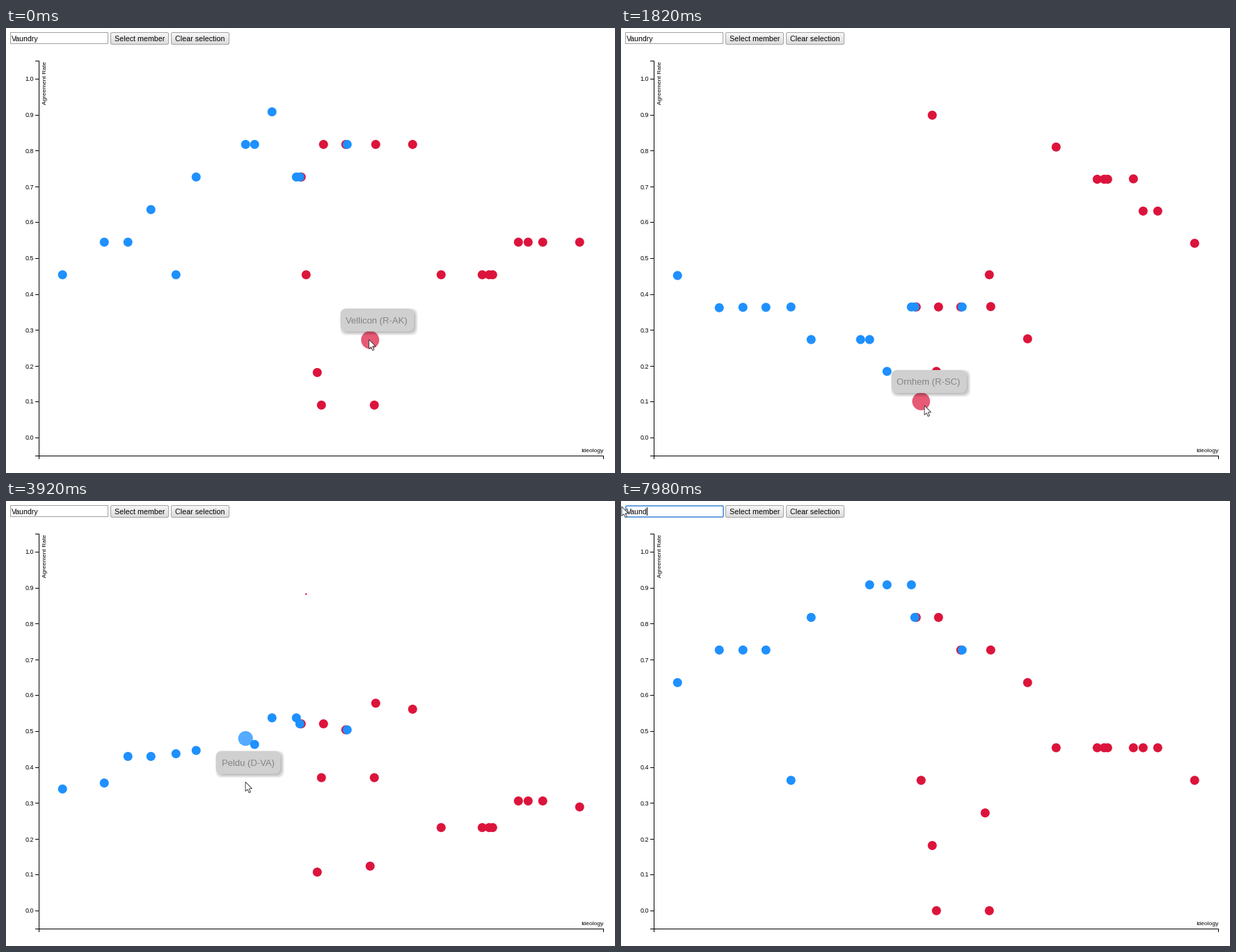
These frames come from a looping animation (875 by 640 pixels, 8 s). A matplotlib script:

```python
import numpy as np
import matplotlib.pyplot as plt
from matplotlib.animation import FuncAnimation
from matplotlib.collections import LineCollection
from matplotlib.colors import to_rgba
from matplotlib.patches import FancyBboxPatch, Polygon, Rectangle

W, H, DPI = 875, 640, 100
PT = 72 / DPI          # points per pixel
STEP = 70              # ms between picture changes
TICK = 20              # ms per drawn frame
LOOP = 8000
FADE_IN, FADE_OUT, MOVE = 200, 500, 1000

BLUE, RED = "#1e90ff", "#dc143c"
R, R_HOVER = 6.5, 13
VOTES = 11             # full agreement; only the selected member has it

# Voting blocs: ideology of the members, then the agreement of the bloc's
# leftmost and rightmost member in each of the four views.
BLOCS = [
    ((81, 141, 175, 208, 273, 344, 357, 382),
     (5, 5, 3, 7), (9.5, 2.4, 4.62, 10.2)),
    ((417, 422, 424, 456, 488, 490, 531, 584),
     (8.4, 4, 4.9, 9.55), (9.4, 3.4, 6.1, 7)),
    ((625, 684, 694, 699, 736, 750, 771, 824),
     (5, 9.4, 2, 5.1), (6, 6.1, 2.95, 4.4)),
    ((244, 431), (5, 4, 5, 4), (5, 1, 5, 4)),
    ((447, 523), (2, 10, 1, 2), (3, 10, 1, 3)),
    ((453, 529), (1, 2, 5, 0), (1, 5, 5, 0)),
]

# ideology, name, and when the dot is entered, clicked and left
PICKS = [
    (523, "Vellicon (R-AK)", -600, -20, 250),
    (431, "Ornhem (R-SC)", 1240, 1678, 2330),
    (344, "Peldu (D-VA)", 3350, 3562, 4480),
]

# pointer moves: start and end time, destination
ORIGIN = (521.5, 448)
LEGS = [
    (140, 840, 439, 516), (1050, 1330, 436, 543), (2310, 2800, 351, 410),
    (3220, 3360, 344, 404), (4410, 5250, 95.5, 18.5), (5880, 6230, 10, 14),
    (6370, 6440, 1, 8),
]

NAME = "Vaundry"
FOCUS, DRAG = 5460, 5950
KEYS = np.array([7490, 7630, 7770, 7840, 7980])


def clamp(u):
    return min(max(u, 0.0), 1.0)


def smooth(u):
    return u * u * (3 - 2 * u)


def cubic(u):
    return 4 * u ** 3 if u < 0.5 else 1 - 4 * (1 - u) ** 3


def level(rate):
    return 589.2 - 515.5 * rate


def is_blue(x):
    return x < 423 or x == 490


def members():
    """One row per member: ideology and the agreement in each view."""
    rows = []
    for xs, first, last in BLOCS:
        for x in xs:
            u = (x - xs[0]) / (xs[-1] - xs[0])
            line = np.array(first) + u * (np.array(last) - first)
            rows.append([x, *np.round(line)])
    rows = np.array(sorted(rows, key=lambda row: is_blue(row[0])))
    for view, pick in enumerate(PICKS, 1):
        rows[rows[:, 0] == pick[0], view + 1] = VOTES
    return rows


def pointer(t):
    pos = np.array(ORIGIN, float)
    for start, end, *goal in LEGS:
        pos += smooth(clamp((t - start) / (end - start))) * (goal - pos)
    return pos


fig = plt.figure(figsize=(W / DPI, H / DPI), dpi=DPI, facecolor="white")
ax = fig.add_axes([0, 0, 1, 1])
ax.set_xlim(0, W)
ax.set_ylim(H, 0)
ax.axis("off")


def label(x, y, s, px, **kw):
    kw = {"color": "black", "va": "baseline", **kw}
    return ax.text(x, y, s, fontsize=px * PT, family="Liberation Sans", **kw)


def strokes(segs, color="black", z=2):
    lines = LineCollection(segs, colors=color, linewidths=PT, zorder=z,
                           capstyle="projecting", snap=False)
    return ax.add_collection(lines, autolim=False)


def rounded(x, y, w, h, radius, **kw):
    style = f"round,pad=0,rounding_size={radius}"
    return ax.add_patch(FancyBboxPatch((x, y), w, h, boxstyle=style,
                                       snap=False, **kw))


def draw_axes():
    left, right, top, bottom = 47.5, 858.5, 47.5, 615.5
    segs = [[(left - 5, top), (left, top), (left, bottom), (left - 5, bottom)],
            [(left, bottom + 4), (left, bottom), (right, bottom),
             (right, bottom + 4)]]
    for rate in np.arange(11) / 10:
        y = np.floor(level(rate)) + 0.5
        segs.append([(left - 5, y), (left, y)])
        label(40, y + 3, f"{rate:.1f}", 8.9, ha="right")
    strokes(segs)
    label(right, 610.5, "Ideology", 8.5, ha="right")
    label(58.5, top, "Agreement Rate", 8.5, rotation=90, ha="right",
          rotation_mode="anchor")


def draw_button(x, w, s):
    shade = np.linspace(0.965, 0.865, 16)
    rows = [[(x + 1.5, 7.5 + i), (x + w - 1.5, 7.5 + i)] for i in range(16)]
    strokes(rows, [(g, g, g) for g in shade], 1)
    rounded(x + 0.5, 6.5, w - 1, 17, 2, fc="none", ec="#a3a3a3", lw=PT)
    label(x + w / 2, 19, s, 10.6, ha="center")


draw_axes()
draw_button(150, 84, "Select member")
draw_button(237, 84, "Clear selection")

plain_box = ax.add_patch(Rectangle((6.5, 6.5), 140, 16, fc="none",
                                   ec="#a0a0a0", lw=PT, snap=False))
focus_box = rounded(7, 7, 140, 16, 1.5, fc="none", ec="#6aa3e4", lw=2 * PT)

# right edge of every prefix of the typed name
typed = label(8, 19, NAME, 10.5, zorder=4)
edges = [8.0]
for n in range(1, len(NAME) + 1):
    typed.set_text(NAME[:n])
    edges.append(typed.get_window_extent().x1)
edges = np.array(edges)
marked = label(8, 19, "", 10.5, color="white", zorder=4)
mark = ax.add_patch(Rectangle((8, 9), 0, 12, fc="#3390ff", lw=0, zorder=3))
caret = strokes([[(0, 0), (0, 0)]], z=4)

DOTS = members()
RGBA = np.array([to_rgba(BLUE if is_blue(x) else RED) for x in DOTS[:, 0]])
dots = ax.scatter(DOTS[:, 0], DOTS[:, 1], s=1, zorder=3, linewidths=0)

GROW = np.arange(-2, 4)
shadow = [rounded(0, 0, 9, 9, 9, fc="black", lw=0, zorder=5) for _ in GROW]
tip_box = rounded(0, 0, 9, 9, 9, fc="#d0d0d0", lw=0, zorder=6)
tip_text = label(0, 0, "", 13, color="#858287", zorder=7)

ARROW = np.array([(0, 0), (0, 13.5), (3, 10.7), (5.2, 15.6), (7.4, 14.6),
                  (5.2, 9.9), (9.4, 9.6)])
arrow = ax.add_patch(Polygon(ARROW, fc="white", ec="#333333", lw=0.9 * PT,
                             zorder=10, snap=False))
BEAM = np.array([[(-3, -5.5), (3, -5.5)], [(0, -5.5), (0, 5.5)],
                 [(-3, 5.5), (3, 5.5)]])
beam = strokes(BEAM, "#333333", 10)


def update_dots(t):
    k = max(i for i, pick in enumerate(PICKS) if t >= pick[3])
    p = cubic(clamp((t - PICKS[k][3]) / MOVE))
    a, b = DOTS[:, k + 1], DOTS[:, k + 2]
    r0 = np.where(b == VOTES, R_HOVER, np.where(a == VOTES, 0, R))
    r1 = np.where(b == VOTES, 0, R)
    size = r0 + p * (r1 - r0)
    rgba = RGBA.copy()
    rgba[b == VOTES, 3] = 0.7 + 0.3 * p
    if k + 1 < len(PICKS):
        x, _, enter, *_ = PICKS[k + 1]
        grow = clamp((t - enter) / FADE_IN)
        hovered = DOTS[:, 0] == x
        size[hovered] += (R_HOVER - R) * grow
        rgba[hovered, 3] = 1 - 0.3 * grow
    y = level((a + p * (b - a)) / VOTES)
    dots.set_offsets(np.column_stack([DOTS[:, 0] + 0.2, y]))
    dots.set_sizes((2 * size * PT) ** 2)
    dots.set_facecolors(rgba)


def place_tip(x, y, s):
    tip_text.set_text(s)
    tip_text.set_position((x + 8, y + 21))
    w, h = tip_text.get_window_extent().width + 17, 33
    tip_box.set_bounds(x, y, w, h)
    for g, part in zip(GROW, shadow):
        part.set_bounds(x + 2.5 - g, y + 2.5 - g, w + 2 * g, h + 2 * g)


def update_tip(t):
    alpha = 0
    for x, s, enter, _, leave in PICKS:
        if enter < t < leave + FADE_OUT:
            alpha = (clamp((t - enter) / FADE_IN)
                     * clamp((leave + FADE_OUT - t) / FADE_OUT))
            place_tip(x - 42.5, pointer(enter)[1] - 44.5, s)
    for part in (tip_box, tip_text):
        part.set_alpha(alpha)
    for part in shadow:
        part.set_alpha(0.05 * alpha)
    for part in (tip_box, tip_text, *shadow):
        part.set_visible(alpha > 0)


def update_input(t, x):
    n = len(NAME)
    keys = int((KEYS <= t).sum())
    cut = keys or n
    if t >= DRAG and not keys:
        cut = int(np.abs(edges - x).argmin())
    selected = cut < n and not keys
    typed.set_text(NAME[:cut])
    marked.set_text(NAME[cut:] if selected else "")
    marked.set_x(edges[cut])
    mark.set_bounds(edges[cut], 9, edges[n] - edges[cut], 12)
    mark.set_visible(selected)
    cx = np.floor(edges[cut]) + 0.5
    caret.set_segments([[(cx, 9.5), (cx, 20.5)]])
    caret.set_visible(t >= FOCUS and not selected)
    plain_box.set_visible(t < FOCUS)
    focus_box.set_visible(t >= FOCUS)


def update(k):
    t = (k * TICK + TICK // 2) // STEP * STEP
    pos = pointer(t)
    over = 7 < pos[0] < 147 and 6 < pos[1] < 24
    arrow.set_xy(ARROW + pos)
    arrow.set_visible(not over)
    beam.set_segments(BEAM + pos)
    beam.set_visible(over)
    update_dots(t)
    update_tip(t)
    update_input(t, pos[0])
    return []


anim = FuncAnimation(fig, update, frames=LOOP // TICK, interval=TICK,
                     repeat=True, repeat_delay=0, blit=False)
plt.show()
```
